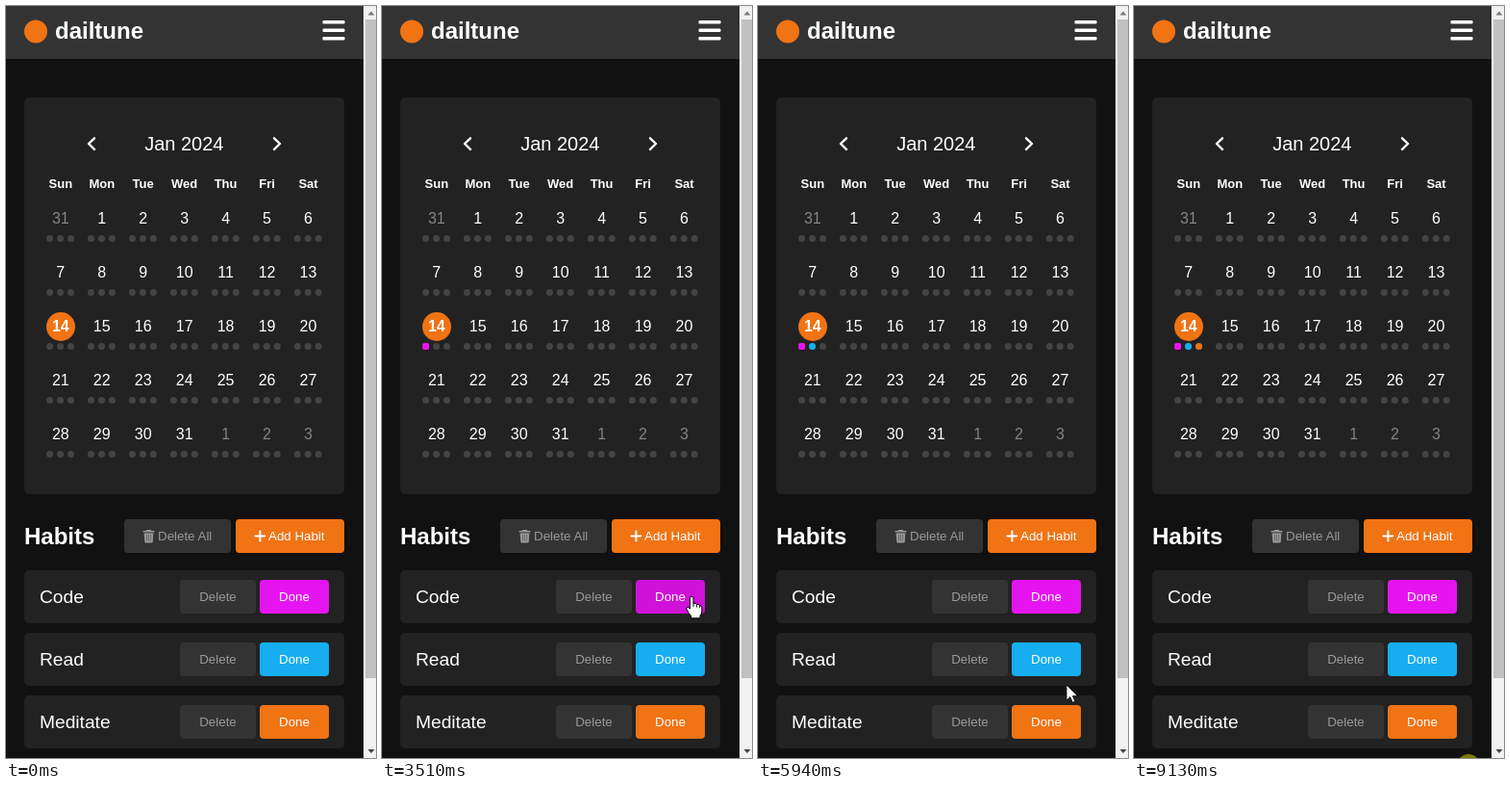
Write an HTML page that moves like this. It is 385 px wide and 781 px high and loops after 9200 ms.

```html
<!DOCTYPE html>
<html lang="en">
<head>
<meta charset="utf-8">
<title>Habit tracker</title>
<style>
html, body { margin: 0; width: 100%; height: 100%; overflow: hidden; background: #111; }
svg { display: block; width: 385px; height: 781px; font-family: "Liberation Sans", Arial, sans-serif; }
</style>
</head>
<body>
<svg id="stage" viewBox="0 0 385 781"></svg>
<script>
const LOOP = 9200, STEP = 70;
const MAGENTA = '#e614f0', CYAN = '#16aef0', ORANGE = '#f07314';
const stage = document.getElementById('stage');

function add(tag, attrs, parent = stage) {
  const el = document.createElementNS('http://www.w3.org/2000/svg', tag);
  for (const k in attrs) el.setAttribute(k, attrs[k]);
  return parent.appendChild(el);
}
const box = (x, y, width, height, fill, rx = 0) => add('rect', { x, y, width, height, fill, rx });
const disc = (cx, cy, r, fill) => add('circle', { cx, cy, r, fill });
const path = (d, attrs, parent) => add('path', { d, ...attrs }, parent);
function label(str, x, y, size, fill = '#fff', anchor = 'middle', weight = 400) {
  const el = add('text', { x, y, fill, 'font-size': size, 'text-anchor': anchor, 'font-weight': weight });
  el.textContent = str;
}

// Header
box(0, 0, 372, 55, '#333');
disc(31, 26.5, 12, ORANGE);
label('dailtune', 51, 34, 24, '#fff', 'start', 700);
for (const y of [15, 23.5, 32]) box(329.5, y, 23, 3.4, '#fff', 1.2);

// Calendar
box(19, 95, 333, 412, '#222', 5);
label('Jan 2024', 185.3, 150, 20);
const chevron = { fill: 'none', stroke: '#fff', 'stroke-width': 2.4, 'stroke-linecap': 'round', 'stroke-linejoin': 'round' };
path('M92 137.3L86 143L92 148.9', chevron);
path('M279 137.3L285 143L279 148.9', chevron);

const colX = c => 56.8 + 42.95 * c;
'Sun Mon Tue Wed Thu Fri Sat'.split(' ').forEach((d, c) => label(d, colX(c), 189, 13, '#fff', 'middle', 700));

for (let i = 0; i < 35; i++) {
  const c = i % 7, x = colX(c), y = 220 + 56 * Math.floor(i / 7);
  const day = (i + 30) % 31 + 1, today = i === 14;
  const outside = i === 0 || i > 31;
  if (today) disc(57, 333, 15, ORANGE);
  label(day, x, y + 6, 16, outside ? '#858585' : '#fff', 'middle', today ? 700 : 400);
  for (let k = -1; k < 2; k++) disc(x - 0.3 + 11 * k, y + 21.5, 3.5, '#444');
}

// Marks under today, with the time each is set
const marks = [
  [2630, box(42, 350, 7, 7, MAGENTA, 2)],
  [5330, disc(56.5, 353.5, 3.5, CYAN)],
  [7440, disc(67.5, 353.5, 3.5, ORANGE)]
];

// Habits
label('Habits', 19, 559, 24, '#fff', 'start', 700);
box(123, 533, 111, 35, '#333', 4);
path('M146.5 544h4l.8 1h3v1.6h-11.6V545h3zM143.7 547.5h9.6l-.6 9q-.1 1-1.1 1h-6.2q-1 0-1.1-1z', { fill: '#999' });
path('M146.4 549v6.5M148.5 549v6.5M150.6 549v6.5', { stroke: '#555', 'stroke-width': 0.7 });
label('Delete All', 158, 555, 13.33, '#999', 'start');
box(239, 533, 113, 35, ORANGE, 4);
path('M264.4 545.6v10M259.4 550.6h10', { stroke: '#fff', 'stroke-width': 2, 'stroke-linecap': 'round' });
label('Add Habit', 273, 555, 13.33, '#fff', 'start');

const buttons = [['Code', MAGENTA], ['Read', CYAN], ['Meditate', ORANGE]].map(([name, color], i) => {
  const y = 586 + 65 * i;
  box(19, y, 333, 55, '#222', 5);
  label(name, 35, y + 34, 19.2, '#fff', 'start');
  box(181, y + 10, 79, 35, '#333', 4);
  label('Delete', 220.5, y + 32, 13.33, '#999');
  const el = box(264, y + 10, 72, 35, color, 4);
  label('Done', 300, y + 32, 13.33);
  return { el, top: y + 10 };
});

// Scrollbar
box(372, 0, 13, 781, '#f1f1f1');
box(374, 14, 11, 684, '#c1c1c1');
path('M376.5 9.5h7l-3.5-4z', { fill: '#777' });
path('M376.5 772h7l-3.5 4z', { fill: '#444' });

// Clicks: from, to, x, y
const clicks = [[2530, 2630, 321, 607], [5200, 5330, 321, 676], [7370, 7440, 318, 738], [9130, 9200, 348, 789]];
const halo = disc(0, 0, 12, 'rgba(240,240,0,.48)');

// Pointer, hot spot at 0,0
const pointer = add('g', { 'stroke-linejoin': 'round' });
const arrow = path('M0 0V16.2L3.8 12.6L6.3 18.3L8.9 17.2L6.4 11.6H11.6Z',
  { fill: '#fff', stroke: '#000', 'stroke-width': 0.8 }, pointer);
const hand = add('g', {}, pointer);
path('M-1.6 1.8Q-1.4 .4 .2 .4T2 2V7.6Q4.6 6.6 5.6 8.5Q7.8 7.9 8.4 9.6Q10.8 9.3 10.8 11.8V16Q10.8 18.4 9 20.2V22.8H-.4V20.6Q-2.8 18 -5 13.6Q-5.6 11.6 -4 11.3Q-2.8 11.2 -1.6 13.2Z',
  { fill: '#fff', stroke: '#000', 'stroke-width': 1 }, hand);
path('M2 7.6V11.2M5.6 8.5V11.6M8.4 9.6V12', { stroke: '#000', 'stroke-width': 0.9 }, hand);

// Pointer route: time, x, y
const route = [
  [660, 354, 770], [900, 346, 715], [1200, 334, 640], [1570, 322, 607], [1640, 321, 607],
  [3440, 321, 607], [3510, 322, 613], [4000, 322, 672], [4140, 322, 683], [4340, 321, 676],
  [5660, 321, 676], [5730, 321, 679], [5940, 321, 705], [6360, 318, 738],
  [8030, 318, 738], [8100, 318, 741], [8590, 328, 783], [LOOP, 348, 789]
];

function locate(t) {
  const i = route.findIndex(k => k[0] > t);
  const [t0, x0, y0] = route[i - 1], [t1, x1, y1] = route[i];
  const p = Math.floor((t - t0) / STEP) * STEP / (t1 - t0);
  return [x0 + (x1 - x0) * p, y0 + (y1 - y0) * p];
}

const show = (el, on) => el.setAttribute('visibility', on ? 'visible' : 'hidden');

function draw(now) {
  const t = now % LOOP, visible = t >= 660;
  const [x, y] = visible ? locate(t) : [400, 800];
  let over = false;
  for (const { el, top } of buttons) {
    const hit = x >= 264 && x < 336 && y >= top && y < top + 35;
    el.style.filter = hit ? 'brightness(.9)' : 'none';
    over = over || hit;
  }
  pointer.setAttribute('transform', `translate(${Math.round(x)} ${Math.round(y)})`);
  show(arrow, visible && !over);
  show(hand, visible && over);
  for (const [at, el] of marks) show(el, t >= at);
  const click = clicks.find(c => t >= c[0] && t < c[1]);
  show(halo, click);
  if (click) {
    halo.setAttribute('cx', click[2]);
    halo.setAttribute('cy', click[3]);
  }
}

const start = performance.now();
function tick() {
  draw(performance.now() - start);
  requestAnimationFrame(tick);
}
tick();
</script>
</body>
</html>
```
